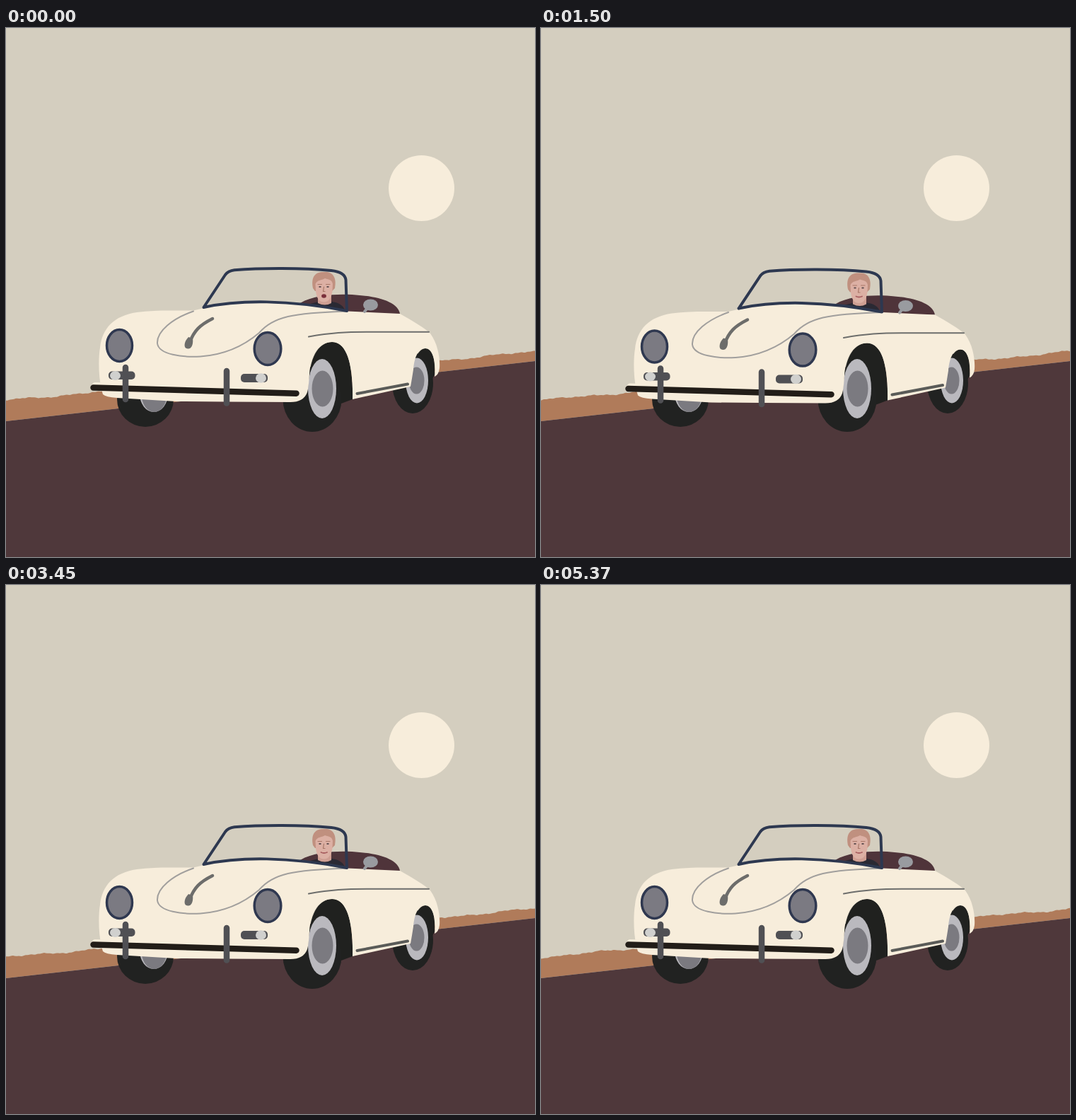
Write an HTML page that moves like this. It is 748 px wide and 748 px high and loops after 5400 ms.

```html
<!DOCTYPE html>
<html lang="en">
<head>
<meta charset="utf-8">
<title>Sunset drive</title>
<style>
  html, body { margin: 0; width: 100%; height: 100%; overflow: hidden; background: #d4cebf; }
  svg { display: block; width: 100vw; height: 100vh; }
  .line { fill: none; stroke-linecap: round; stroke-linejoin: round; }
</style>
</head>
<body>
<svg viewBox="0 0 748 748">
  <defs>
    <filter id="speed" x="-30%" y="-10%" width="160%" height="120%">
      <feGaussianBlur stdDeviation="7 0.6"/>
    </filter>
    <g id="palm">
      <path fill="#806a67" opacity=".5" d="M-8 30 L12 30 L14 212 L-4 212Z"/>
      <path fill="#9b8983" opacity=".5" d="M-6 26 C-34 38 -50 60 -54 86 L-38 82 L-26 90 L-14 74 L0 88 L12 70 L24 84 C26 56 20 40 8 26Z"/>
      <g id="fronds" fill="#4f383b"></g>
    </g>
  </defs>

  <rect width="748" height="748" fill="#d4cebf"/>
  <circle cx="587.5" cy="226.5" r="46.5" fill="#f7eddb"/>
  <g id="palms"></g>
  <path id="ridge" fill="#b07b5a"/>
  <path fill="#4f383b" d="M0 556 L748 471 V748 H0Z"/>

  <g class="bounce" fill="#20211f">
    <path d="M490 525 C491 470 480 444 461 444 C445 444 430 460 428 500 L440 536 L474 531Z"/>
    <path d="M606 490 C608 470 603 453 593 453 C584 453 574 468 571 508 L590 520Z"/>
  </g>

  <g id="wheels">
    <g fill="#212221">
      <ellipse cx="197" cy="525" rx="40" ry="39"/>
      <ellipse cx="433" cy="525" rx="41.5" ry="46"/>
      <ellipse cx="575" cy="502" rx="29" ry="43"/>
    </g>
    <g fill="#bab9be">
      <ellipse cx="209" cy="517" rx="20" ry="26"/>
      <ellipse cx="447" cy="510" rx="20" ry="42"/>
      <ellipse cx="581" cy="498.500" rx="16" ry="32"/>
    </g>
    <g fill="#7b7a80">
      <ellipse cx="209.500" cy="518" rx="18" ry="25"/>
      <ellipse cx="447.500" cy="510" rx="15" ry="25.500"/>
      <ellipse cx="580.500" cy="498.500" rx="11" ry="19"/>
    </g>
  </g>

  <g class="bounce">
    <path fill="#4f343a" d="M416 389 C440 375 480 376 500 378 C530 380 555 389 557 404 L483 404 L420 396Z"/>

    <g id="driver">
      <path fill="#2a2933" d="M430 390 L442 387 H460 C470 388 478 392 480 402 H430Z"/>
      <path fill="#cf9f93" d="M441 376 H460 V389 Q451 394 441 389Z"/>
      <path fill="#c0907f" d="M434 368 C431 352 437 345 449 345 C462 344 468 352 465 368 L461 372 H437Z"/>
      <path fill="#dcb0a4" d="M437.500 362 C440 356 446 357 451 354 C457 356 461 356 462 362 L461.500 372 C460 382 456 387.500 449.500 387.500 C443 387.500 439 382 438 372Z"/>
      <path class="line" stroke="#a87767" stroke-width="1.200" d="M441 362.500 L446.500 362.500 M452.500 362.500 L458 362.500 M449.500 366 L448.500 372.500 H451"/>
      <g fill="#5a4a4c">
        <ellipse cx="444" cy="366" rx="1.800" ry="1.100"/>
        <ellipse cx="455" cy="366" rx="1.800" ry="1.100"/>
      </g>
      <path id="smile" class="line" stroke="#a85f60" stroke-width="1.800" d="M445.500 378 Q449.500 380 454 378"/>
      <ellipse id="gasp" cx="449.500" cy="379" rx="3.400" ry="2.800" fill="#7a2f3a"/>
    </g>

    <path fill="#f7eddb" d="M137 518 C131 500 130 470 133 452 C136 425 152 407 185 402
      C215 398 245 400 265 399.500 L280 396 C330 384 400 383 483 400.500 L557 404
      C573 413 592 424 600 432 C611 447 614 468 613 481 Q612 490 606 493
      C608 470 603 453 593 453 C582 453 577 468 576 483 Q574 496 572 507
      L490 525 C491 470 480 444 461 444 C444 444 431 460 429 490
      Q428 508 426 515 Q421 529 402 529 L312 528.500 L240 528 L157 523 Q141 522 137 518Z"/>

    <g class="line" stroke="#a19f9d" stroke-width="2">
      <path d="M265 400.500 C235 411 213 429 214 446 C216 462 250 466 275 464.500 C311 462 338 448 358 431 C378 408 405 403 483 400.500"/>
      <path stroke="#6d6e6c" d="M428 436.500 C460 431 480 429.800 510 429.800 H598"/>
      <path stroke="#5a5b58" stroke-width="4" d="M496.500 517 L568 503.500"/>
      <path stroke="#6d6d6b" stroke-width="4.500" d="M292 411 C274 420 266 428 260 444"/>
    </g>
    <path fill="#6d6d6b" d="M258 437 C252 443 250 453 257 453.500 C263 454 265 446 264 439Z"/>

    <g fill="#7b7a82" stroke="#2f3850" stroke-width="3.500">
      <ellipse cx="160.500" cy="449" rx="18" ry="22.500"/>
      <ellipse cx="370" cy="453.500" rx="18.800" ry="23"/>
    </g>

    <g fill="#505054">
      <rect x="145" y="485.500" width="37.500" height="11.500" rx="5"/>
      <rect x="332" y="489" width="38" height="12" rx="5"/>
    </g>
    <g fill="#d0d0ce">
      <ellipse cx="154.500" cy="491.500" rx="7.500" ry="6.500"/>
      <ellipse cx="360.500" cy="495" rx="7.500" ry="6.800"/>
    </g>

    <g class="line">
      <path stroke="#f7eddb" stroke-width="9" d="M126 505.500 L412 514"/>
      <path stroke="#221d18" stroke-width="8.500" d="M123.500 508.500 L410.500 516.700"/>
      <path stroke="#505054" stroke-width="8.500" d="M169 480 V525 M312 485 V530.500"/>
      <path stroke="#2d3850" stroke-width="4" d="M279.500 395 L310 349 Q314 343.500 323 342.300 C360 339 420 339 460 343 Q479 345 480.500 356 L482 400 C400 384 330 384 279.500 395"/>
    </g>

    <path class="line" stroke="#999ba0" stroke-width="4" d="M511 396 L507 401"/>
    <ellipse cx="515.500" cy="391.500" rx="10.500" ry="8" fill="#999ba0"/>
  </g>
</svg>

<script>
const LOOP = 5400, STEP = 30, SPEED = 2.1;
const SVG = "http://www.w3.org/2000/svg";
const $ = id => document.getElementById(id);

function add(parent, tag, attrs) {
  const el = document.createElementNS(SVG, tag);
  for (const key in attrs) el.setAttribute(key, attrs[key]);
  return parent.appendChild(el);
}

// Palm crown: leaves curving out of the centre, given by tip and half thickness
function leaf([x, y, w]) {
  const cx = x * 0.5, cy = y * 0.6 - 12;
  add($("fronds"), "path", { d: `M0 8 Q${cx} ${cy - w} ${x} ${y} Q${cx} ${cy + w} 0 12Z` });
}
[[-80, -10, 18], [-68, -34, 17], [-34, -43, 16], [-4, -52, 20], [26, -45, 16],
 [54, -34, 17], [82, -12, 18], [104, 20, 15], [-60, 14, 14],
 [-96, 43, 6], [94, 62, 7], [-60, 46, 4], [60, 34, 6]].forEach(leaf);
add($("fronds"), "ellipse", { cx: 3, cy: -6, rx: 42, ry: 24 });

// Each pass: moment at which the leading palm stands at x = 450, and tree size
const passes = [{ at: 285, size: 1 }, { at: 2010, size: 0.66 }, { at: 3750, size: 1 }];
const palms = passes.flatMap(pass => [450, 208].map(x => ({
  ...pass, x, el: add($("palms"), "use", { href: "#palm", filter: "url(#speed)" })
})));

function drawPalms(t) {
  for (const { at, size, x, el } of palms) {
    const px = x + SPEED * (t - at);
    const visible = px > -130 && px < 880;
    el.style.display = visible ? "" : "none";
    if (!visible) continue;
    const ground = 524 - 0.078 * px;
    const scale = size * (210 + 0.112 * px) / 260;
    el.setAttribute("transform", `translate(${px} ${ground - 210 * scale}) scale(${scale})`);
  }
}

// Waves have whole counts over the loop, so the ridge closes on itself
const waves = [[80, 1], [190, 0.75], [510, 0.45], [1270, 0.3]];
function drawRidge(t) {
  const turn = 2 * Math.PI / (SPEED * LOOP);
  let d = "M0 556";
  for (let x = 0; x <= 748; x += 2) {
    const u = (x - SPEED * t) * turn;
    const bump = waves.reduce((sum, [k, a]) => sum + a * Math.sin(k * u + k), 0);
    d += `L${x} ${(526.5 - 0.092 * x + bump).toFixed(2)}`;
  }
  $("ridge").setAttribute("d", d + "L748 471Z");
}

// Two damped bumps of the suspension, twice per loop
function bounce(t) {
  const phase = t % (LOOP / 2);
  for (const start of [240, 1410]) {
    const s = phase - start;
    if (s > 0 && s < 450) return 9.3 * Math.exp(-s / 141) * Math.sin(s * Math.PI / 100);
  }
  return 0;
}

const sprung = document.querySelectorAll(".bounce");
function draw(t) {
  drawPalms(t);
  drawRidge(t);
  const y = bounce(t).toFixed(2);
  sprung.forEach(el => el.setAttribute("transform", `translate(0 ${y})`));
  const gasping = t < 660;
  $("gasp").style.display = gasping ? "" : "none";
  $("smile").style.display = gasping ? "none" : "";
}

const begin = performance.now();
function tick(now) {
  const t = Math.max(0, now - begin) % LOOP;
  draw(Math.floor(t / STEP) * STEP);
  requestAnimationFrame(tick);
}
draw(0);
requestAnimationFrame(tick);
</script>
</body>
</html>
```
